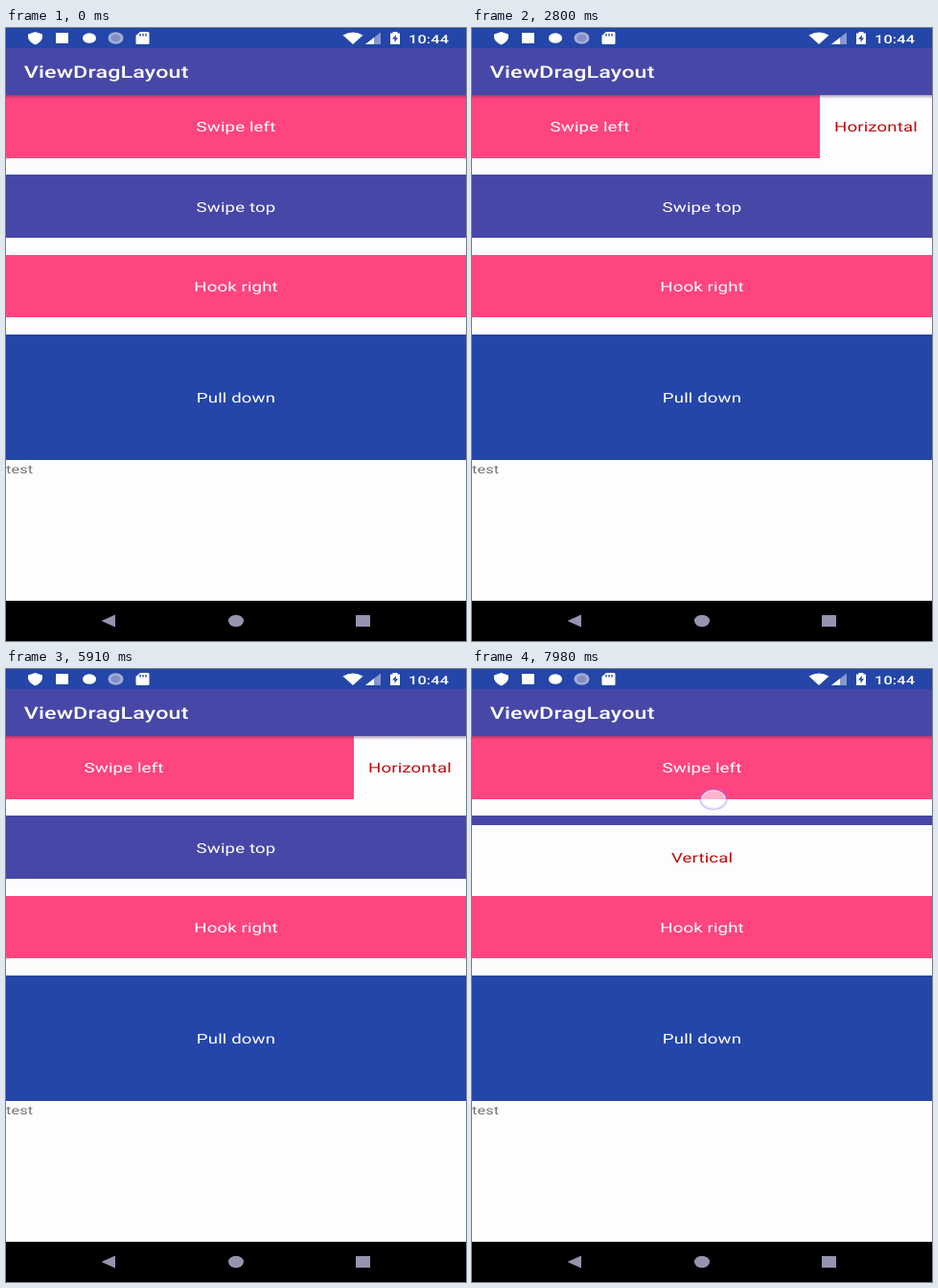
Recreate the animation shown at these times as an HTML page. Size 480 by 640 pixels, loop 8 s.

```html
<!DOCTYPE html>
<html lang="en">
<head>
<meta charset="utf-8">
<title>ViewDragLayout</title>
<style>
  html, body { margin: 0; width: 100%; height: 100%; overflow: hidden; background: #fdfdff; }
  svg { display: block; width: 100%; height: 100%; }
  text { font: 16px Roboto, sans-serif; letter-spacing: .1px; text-rendering: geometricPrecision; fill: #fff; }
  .mid { text-anchor: middle; }
  .action { fill: #c00a0a; }
  .pink { fill: #ff4580; }
  .indigo { fill: #4747a8; }
  .blue { fill: #2446a8; }
  .paper { fill: #fdfdff; }
</style>
</head>
<body>
<svg viewBox="0 0 480 640" preserveAspectRatio="none">
  <defs>
    <linearGradient id="shade" x2="0" y2="1">
      <stop stop-color="#402060" stop-opacity=".4"/>
      <stop offset="1" stop-color="#402060" stop-opacity="0"/>
    </linearGradient>
    <clipPath id="rowClip"><rect y="153" width="480" height="66"/></clipPath>
  </defs>
  <rect class="paper" width="480" height="640"/>
  <rect y="594" width="480" height="4" fill="#fff"/>

  <g id="leftRow">
    <rect class="pink" y="70" width="480" height="66"/>
    <rect class="paper" x="480" y="70" width="117" height="66"/>
  </g>
  <g clip-path="url(#rowClip)">
    <g id="topRow">
      <rect class="indigo" y="153" width="480" height="66"/>
      <rect class="paper" y="219" width="480" height="66"/>
    </g>
  </g>
  <g id="page">
    <rect class="pink" y="237" width="480" height="65"/>
    <rect class="blue" y="320" width="480" height="131"/>
  </g>

  <rect y="70" width="480" height="4" fill="url(#shade)"/>
  <g id="bars">
    <rect class="blue" width="480" height="21"/>
    <rect class="indigo" y="21" width="480" height="49"/>
    <g fill="#fff">
      <path d="M30.5 4L38 6.5V10Q37 15 30.5 17.5Q24 15 23 10V6.5Z"/>
      <rect x="52" y="5" width="13" height="11"/>
      <ellipse cx="87" cy="10.5" rx="7" ry="5.3"/>
      <ellipse cx="114.5" cy="10.5" rx="8" ry="6.2" fill="#a5aed8"/>
      <ellipse cx="114.5" cy="10.5" rx="5" ry="3.8" fill="#8290c8"/>
      <path d="M140 4H148Q149.5 4 149.5 5.5V15.5Q149.5 17 148 17H137Q135.5 17 135.5 15.5V8Z"/>
      <path d="M351.5 7.5Q362 1.5 372.5 7.5L362 17Z"/>
      <path d="M391 4.5V17H375Z" opacity=".45"/>
      <path d="M384 10V17H375Z"/>
      <path d="M403.5 5.5V4H408.5V5.5H411V17H401V5.5Z"/>
    </g>
    <path d="M140 6V8.5M143 6V8.5M146 6V8.5" stroke="#2446a8" stroke-width="1.4"/>
    <path class="blue" d="M407 7L403 11.5H405.5V15L409 10.3H406.7Z"/>
  </g>
  <rect y="598" width="480" height="42"/>
  <g fill="#9494b0">
    <path d="M99.5 619L114 612.5V625.5Z"/>
    <ellipse cx="240" cy="619" rx="8" ry="6.2"/>
    <rect x="365" y="613" width="15" height="12"/>
  </g>
  <g id="touch">
    <ellipse rx="14" ry="10.5" fill="none" stroke="#8f6cf4" stroke-opacity=".35" stroke-width="2"/>
    <ellipse rx="12.3" ry="9.2" fill="#fff" fill-opacity=".6" stroke="#f2e4ff" stroke-opacity=".8" stroke-width="1.4"/>
  </g>
</svg>
<script>
const LOOP = 8000;
const OPEN = -117;
const byId = id => document.getElementById(id);

// The 411 x 731 dp screen fills the 480 x 640 stage.
function label(parent, x, y, words, cls = 'mid', size = 16, weight = 400, fill) {
  const el = document.createElementNS('http://www.w3.org/2000/svg', 'text');
  el.setAttribute('transform', `translate(${x} ${y}) scale(${480 / 411.43} .875)`);
  el.setAttribute('class', cls);
  el.style.fontSize = size + 'px';
  el.style.fontWeight = weight;
  if (fill) el.style.fill = fill;
  el.textContent = words;
  byId(parent).append(el);
}
label('leftRow', 240, 108.2, 'Swipe left');
label('leftRow', 480 - OPEN / 2, 108.2, 'Horizontal', 'mid action');
label('topRow', 240, 191.6, 'Swipe top');
label('topRow', 240, 257.6, 'Vertical', 'mid action');
label('page', 240, 275, 'Hook right');
label('page', 240, 391, 'Pull down');
label('page', 0, 465, 'test', '', 14, 400, '#757579');
label('bars', 18.7, 52.3, 'ViewDragLayout', '', 20, 500);
label('bars', 420, 15.6, '10:44', '', 14, 500);

// Interpolates [time, value] points, holding the ends.
function track(t, points) {
  if (t <= points[0][0]) return points[0][1];
  for (let i = 1; i < points.length; i++) {
    const [t0, a] = points[i - 1], [t1, b] = points[i];
    if (t < t1) return a + (b - a) * (t - t0) / (t1 - t0);
  }
  return points[points.length - 1][1];
}

const slide = [
  [2270, 0], [2350, -10], [2600, -95], [2760, OPEN],
  [3690, OPEN], [3770, -108], [3990, -20], [4110, 0],
  [4929, 0], [4930, -2], [5040, -25], [5220, -96], [5320, OPEN],
  [6150, OPEN], [6220, -100], [6400, -15], [6500, 0]
];
const lift = [[7780, 0], [7980, -56]];

// Finger positions are relative to the dragged row.
const drags = [
  { from: 2230, to: 2720, x: 394, y: [106, 103] },
  { from: 3690, to: 4090, x: 350, y: [102, 100] },
  { from: 4930, to: 5910, x: 326, y: [102, 101] },
  { from: 6130, to: 6720, x: 237, y: [101, 97] }
];

function finger(t, dx, dy) {
  if (t >= 7760) return [252, 192 + dy];
  const d = drags.find(g => t >= g.from && t < g.to);
  return d && [d.x + dx, track(t, [[d.from, d.y[0]], [d.from + 400, d.y[1]]])];
}

function update(t) {
  const dx = track(t, slide), dy = track(t, lift);
  byId('leftRow').setAttribute('transform', `translate(${dx} 0)`);
  byId('topRow').setAttribute('transform', `translate(0 ${dy})`);
  const at = finger(t, dx, dy);
  byId('touch').style.display = at ? '' : 'none';
  if (at) byId('touch').setAttribute('transform', `translate(${at})`);
}

const start = performance.now();
function tick() {
  update((performance.now() - start) % LOOP);
  requestAnimationFrame(tick);
}
tick();
</script>
</body>
</html>
```
